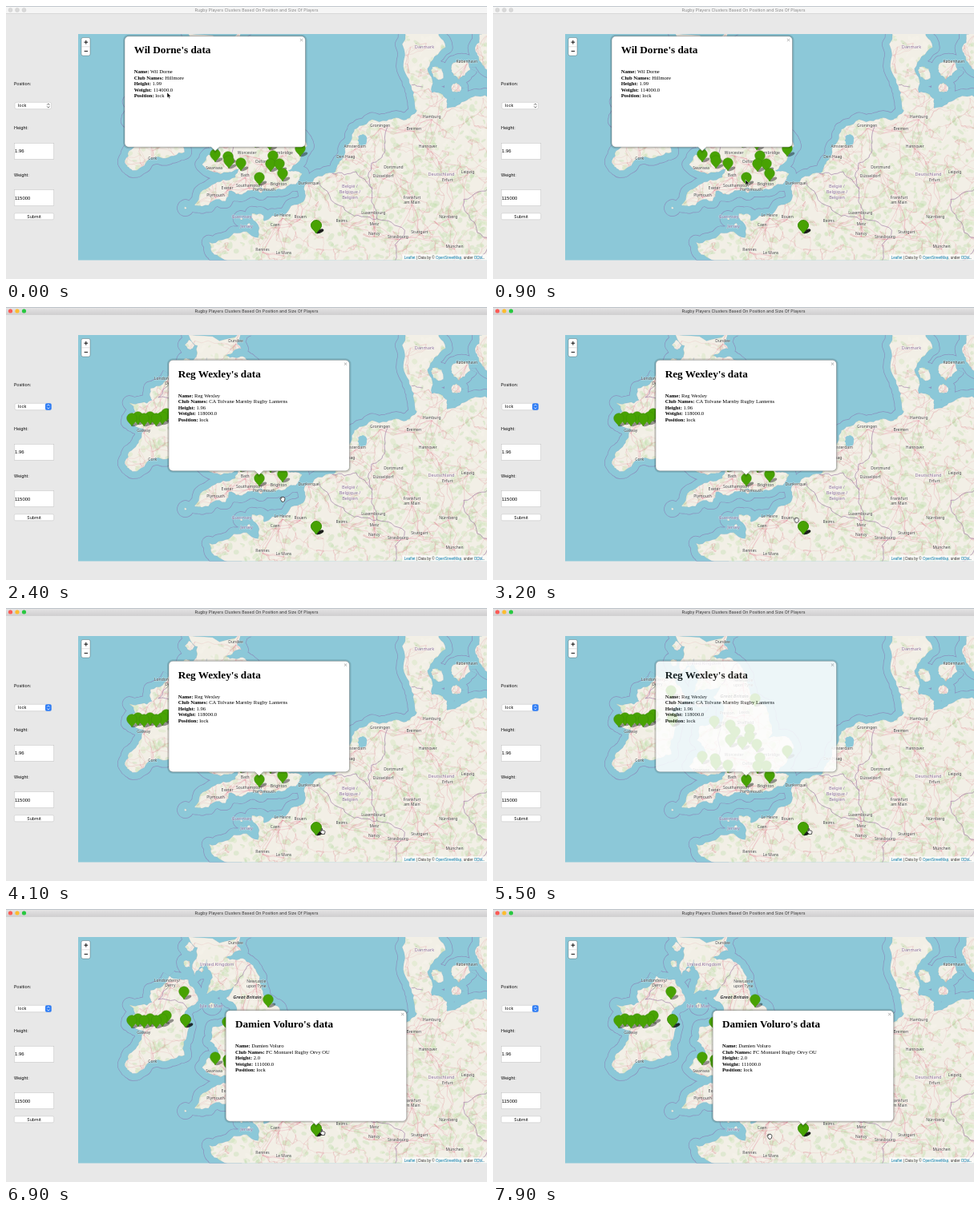
An HTML page with a canvas for the animation above (8000 ms loop, 600 by 341 pixels).

```html
<!DOCTYPE html>
<html lang="en">
<head>
<meta charset="utf-8">
<title>Rugby Players Clusters</title>
<style>
html, body { margin: 0; width: 100%; height: 100%; overflow: hidden; background: #e8e8e8; }
canvas, svg { position: absolute; left: 0; top: 0; width: 600px; height: 341px; }
.ui { font: 5.25px Inter, sans-serif; fill: #000; }
.input { font: 5.9px "Liberation Sans", sans-serif; }
.place { font: 5px "Noto Sans", sans-serif; fill: #444; text-anchor: middle;
  paint-order: stroke; stroke: #fff; stroke-opacity: .45; stroke-width: .9px; }
.country { fill: #8c6f9c; font-size: 5.6px; }
.island { fill: #333; font-weight: 600; font-style: italic; font-size: 5.8px; }
.popup { font: 6.6px "Liberation Serif", serif; fill: #000; }
.popup .head { font-size: 13.2px; font-weight: bold; }
.popup .key { font-weight: bold; }
.credit { font: 4.58px "Liberation Sans", sans-serif; fill: #333; }
.credit tspan { fill: #0078a8; }

.first, .second, .third, #cursor { animation: 8s linear infinite; }
.first { animation-name: first; }
.second { animation-name: second; }
.third { animation-name: third; }
#cursor { animation-name: roam; }
.idle, .active, .arrow, .grab, .point { animation: 8s step-end infinite; }
.idle { animation-name: idle; }
.active { animation-name: active; }
.arrow { animation-name: arrow; }
.grab { animation-name: grab; }
.point { animation-name: point; }

@keyframes first { 0%, 14.875% { opacity: 1 } 17.375%, 100% { opacity: 0 } }
@keyframes second { 0%, 14.6% { opacity: 0 } 17.1%, 68.375% { opacity: 1 } 70.875%, 100% { opacity: 0 } }
@keyframes third { 0%, 83.5% { opacity: 0 } 86%, 100% { opacity: 1 } }
@keyframes idle { 0% { opacity: 1 } 13.75%, 100% { opacity: 0 } }
@keyframes active { 0% { opacity: 0 } 13.75%, 100% { opacity: 1 } }
@keyframes arrow { 0% { opacity: 1 } 18.75%, 100% { opacity: 0 } }
@keyframes grab { 0% { opacity: 0 } 18.75% { opacity: 1 } 43.75% { opacity: 0 } 88.75%, 100% { opacity: 1 } }
@keyframes point { 0% { opacity: 0 } 43.75% { opacity: 1 } 88.75%, 100% { opacity: 0 } }
@keyframes roam {
  0%, 2.5% { transform: translate(201px, 108px); animation-timing-function: ease-in-out }
  11.25%, 17.5% { transform: translate(315px, 217px); animation-timing-function: ease-in-out }
  25%, 32.5% { transform: translate(345px, 240px); animation-timing-function: ease-in-out }
  45%, 87.5% { transform: translate(395px, 279px); animation-timing-function: ease-in-out }
  96.25%, 100% { transform: translate(345px, 284px) }
}
</style>
</head>
<body>
<canvas id="map" width="600" height="341"></canvas>
<svg viewBox="0 0 600 341">
  <defs>
    <linearGradient id="bar" x2="0" y2="1"><stop stop-color="#e6e5e6"/><stop offset="1" stop-color="#d0cfd0"/></linearGradient>
    <clipPath id="frame"><rect x="90" y="35" width="510" height="282.5"/></clipPath>
    <path id="pin" d="M0 10C-1 7-6.3 4.5-6.3 0A6.3 6.3 0 0 1 6.3 0C6.3 4.5 1 7 0 10Z" fill="#48a203" stroke="#3a8a06" stroke-width=".5"/>
    <ellipse id="shade" cx="4.6" cy="7.4" rx="5" ry="2.1" transform="rotate(-24 4.6 7.4)" fill-opacity=".4"/>
  </defs>

  <g class="ui">
    <rect width="600" height="9.5" fill="#f5f5f5"/>
    <g class="idle">
      <g fill="#d9d9d9" stroke="#c4c4c4" stroke-width=".4"><circle cx="5.5" cy="5" r="2.5"/><circle cx="14" cy="5" r="2.5"/><circle cx="22.5" cy="5" r="2.5"/></g>
      <text x="312.5" y="7" text-anchor="middle" fill="#888">Rugby Players Clusters Based On Position and Size Of Players</text>
    </g>
    <g class="active">
      <rect width="600" height="9.5" fill="url(#bar)"/>
      <circle cx="5.5" cy="5" r="2.6" fill="#fc5b56"/><circle cx="14" cy="5" r="2.6" fill="#fdbc2e"/><circle cx="22.5" cy="5" r="2.6" fill="#28c840"/>
      <text x="312.5" y="7" text-anchor="middle" fill="#333">Rugby Players Clusters Based On Position and Size Of Players</text>
    </g>
    <rect width="600" height=".8" fill="#b5bcc4"/>
    <rect y="9.2" width="600" height=".5" fill="#c2c2c2"/>

    <text x="10" y="98.5">Position:</text>
    <text x="10" y="154">Height:</text>
    <text x="10" y="212.5">Weight:</text>
    <g fill="#fff" stroke="#c8c8c8" stroke-width=".6">
      <rect x="11" y="120.3" width="45.5" height="8.4" rx="2"/>
      <rect x="10.3" y="171.3" width="49.4" height="20"/>
      <rect x="10.3" y="229.5" width="49.4" height="20"/>
      <rect x="10.3" y="258.8" width="49.4" height="8" rx="1.6"/>
    </g>
    <rect class="active" x="49" y="120.2" width="7.7" height="8.6" rx="1.8" fill="#2f7df5"/>
    <path class="idle" d="M51.2 123.6l1.6-1.7 1.6 1.7M51.2 125.4l1.6 1.7 1.6-1.7" fill="none" stroke="#444" stroke-width=".8"/>
    <path class="active" d="M51.2 123.6l1.6-1.7 1.6 1.7M51.2 125.4l1.6 1.7 1.6-1.7" fill="none" stroke="#fff" stroke-width=".8"/>
    <text x="15" y="126.4">lock</text>
    <text class="input" x="11" y="183.4">1.96</text>
    <text class="input" x="11" y="241.7">115000</text>
    <text x="35" y="264.7" text-anchor="middle">Submit</text>
  </g>

  <g clip-path="url(#frame)">
    <g id="labels"></g>
    <g id="pins"></g>
  </g>

  <rect x="494" y="310.2" width="106" height="7.3" fill="#fff" fill-opacity=".7"/>
  <text class="credit" x="597" y="315.5" text-anchor="end"><tspan>Leaflet</tspan> | Data by © <tspan>OpenStreetMap</tspan>, under <tspan>ODbL</tspan>.</text>
  <rect x="94" y="39.5" width="11" height="22.5" rx="2" fill="#fff" stroke="#000" stroke-opacity=".25"/>
  <path d="M94 50.8h11" stroke="#ccc" stroke-width=".6"/>
  <path d="M97.4 45.2h4.8M99.8 42.8v4.8M97.6 56.4h4.4" stroke="#111"/>

  <g id="popups"></g>
  <g id="cursor" stroke-linejoin="round">
    <path class="arrow" d="M0 0V6.6L1.5 5.3 2.5 7.5 3.6 7 2.6 4.9H4.7Z" fill="#000" stroke="#fff" stroke-width=".5"/>
    <path class="grab" d="M-2.6 .2C-3.6-1.4-2.4-2-1.6-.7L-1.8-2.3C-1.5-3.3-.7-3-.5-2.2-.3-3.5.7-3.4.8-2.2 1.2-3 2-2.6 2-1.6 2.8-1.9 3.1-1.2 2.9-.3L2.4 2.1 1.6 3.2H-1Z" fill="#fff" stroke="#222" stroke-width=".8"/>
    <path class="point" d="M-1.6-.2V-3.2C-1.5-4.2-.5-4.1-.4-3.2V-1C.1-1.5.7-1.3.9-.7 1.5-1.1 2-.8 2.1-.3 2.8-.6 3.1 0 3 .6L2.4 3.4H-1L-2.9.7C-3.1-.2-2.2-.6-1.6-.2Z" fill="#fff" stroke="#222" stroke-width=".8"/>
  </g>
</svg>

<script>
const byId = id => document.getElementById(id);
const ctx = byId('map').getContext('2d');
let seed = 7;
const rand = () => (seed = seed * 16807 % 2147483647) / 2147483647;

// Web Mercator, longitude and latitude to stage pixels
const project = (lon, lat) => [
  342.65 + 18.87 * lon,
  1343 - 1081.2 * Math.log(Math.tan(Math.PI / 4 + lat * Math.PI / 360))
];

// Main capes and bays; the ragged coast between them is random
const britain = [-2.1,57, -2.87,56.45, -2.6,56.28, -3.6,56.04, -2.5,56, -1.6,55.5, -1.17,54.65, -.08,54.12,
  .1,53.6, .33,53.1, .05,52.9, .5,52.96, 1.3,52.93, 1.75,52.5, 1.25,51.9, .5,51.5, 1.42,51.38, .98,50.93,
  .25,50.74, -1.3,50.8, -2.45,50.55, -3.4,50.65, -3.65,50.22, -5.2,50, -5.7,50.06, -4.55,50.9, -3,51.22,
  -2.6,51.65, -3.5,51.42, -5.2,51.75, -4.1,52.35, -4.7,52.82, -4.5,53.38, -3.1,53.35, -2.9,54.1, -3.6,54.5,
  -3.1,54.95, -4.9,54.65, -4.62,55.5, -4.88,55.95, -5.7,55.35, -5.5,56.4, -6.1,56.8];
const ireland = [-7.35,55.35, -6.1,55.2, -5.45,54.4, -6.3,54, -6.1,53.3, -6.35,52.25, -7.8,52, -9.8,51.5,
  -10.3,51.9, -9.5,52.6, -9,53.2, -10.1,53.5, -9.6,53.9, -10,54.25, -8.5,54.35, -8.6,54.8];
const continent = [8.1,57.2, 8.1,55.6, 8.8,54.6, 9,53.9, 8.3,53.55, 7,53.5, 5.2,53.3, 4.7,52.95, 4.1,52, 3.5,51.4,
  1.6,50.9, 1.5,50.2, .1,49.6, -1.1,49.37, -1.3,49.68, -1.9,49.7, -1.5,48.65, -3.1,48.85, -4.75,48.45,
  -4.4,47.9, -3,47.5, -3,43, 18,43, 18,53.9, 13.5,54.5, 12.3,54.3, 11,54, 11,54.35, 10,54.6, 9.7,55.5,
  10.9,56.3, 10.3,57.2];
// longitude, latitude, radius in degrees
const islands = [[10.4,55.35,.42], [11.8,55.5,.68], [11.6,54.78,.36], [14.1,56.2,1.4], [-4.55,54.22,.18], [-1.3,50.67,.16],
  [-5.25,55.58,.17], [-6.2,55.8,.26], [-6,56.42,.28], [-2.6,49.46,.08], [-2.12,49.21,.1], [-6.3,49.93,.08]];
const borders = [
  [7.1,53.3, 6.9,52.3, 6,51.8, 6.05,50.75, 6.1,50.1, 6.35,49.47, 8.2,48.97, 7.55,47.6],
  [3.4,51.38, 5,51.45, 6.05,50.75],
  [2.55,51.08, 4.15,49.98, 5.8,49.55, 6.35,49.47],
  [-7.3,55.05, -8.1,54.45, -6.1,54.05],
  [-3.05,54.98, -2,55.78], [-3.1,53.3, -2.65,51.6], [8.65,54.9, 9.4,54.82],
  [14,50.8, 12.1,50.3, 12.6,49.4, 13.8,48.6, 12.8,47.6]
];
const cities = [
  ['Dundee',-2.97,56.46], ['Newcastle',-1.61,55.05], ['upon Tyne',-1.61,54.87], ['Londonderry/',-7.5,55.08], ['Derry',-7.3,54.9],
  ['Leeds',-1.55,53.8], ['Sheffield',-1.47,53.38], ['Preston',-2.7,53.76], ['Liverpool',-2.98,53.41],
  ['Galway',-9.05,53.05], ['Cork',-8.47,51.9], ['Worcester',-2.22,52.1], ['Cambridge',.12,52.1], ['Oxford',-1.26,51.75],
  ['Swansea',-4.4,51.48], ['Bath',-2.36,51.2], ['Southampton',-2.1,50.77], ['Portsmouth',-1.09,50.58],
  ['Brighton',-.14,50.82], ['Exeter',-3.53,50.67], ['Plymouth',-4.3,50.37], ['Dunkerque',1.85,50.87],
  ['Le Havre',.11,49.49], ['Rouen',1.3,49.44], ['Caen',-.37,49.1], ['Rennes',-1.2,48], ['Le Mans',.2,47.85],
  ['Reims',4.03,49.25], ['Luxembourg',6.13,49.6], ['Metz',6.18,49.12], ['Nancy',6.18,48.69], ['Strasbourg',7.75,48.57],
  ['Stuttgart',9.18,48.78], ['Frankfurt',8.68,50.27], ['am Main',8.68,50.05], ['Nürnberg',11.08,49.45], ['München',11.5,48.14],
  ['Groningen',6.57,53.2], ['Amsterdam',4.9,52.37], ['Den Haag',4.3,51.95], ['Dortmund',7.46,51.51], ['Düsseldorf',6.78,51.15],
  ['Bremen',8.8,53.08], ['Hamburg',10,53.55], ['Hannover',9.73,52.37], ['Leipzig',12.37,51.34], ['Erfurt',11.03,50.98],
  ['København',12.3,55.68]
];
const regions = [['United Kingdom',263,71], ['Isle of Man',256,123], ['Danmark',522,53], ['Deutschland',543,212],
  ['België /',429,227], ['Belgique /',429,234], ['Belgien',429,241], ['Guernsey',294,265], ['Jersey',300,277]];

// Splits every segment at a randomly shifted midpoint, several times over
function ragged(pts, depth = 3) {
  if (!depth) return pts;
  const out = [pts[0]];
  for (let i = 1; i < pts.length; i++) {
    const [ax, ay] = pts[i - 1], [bx, by] = pts[i], k = (rand() - .5) * .34;
    out.push([(ax + bx) / 2 + (by - ay) * k, (ay + by) / 2 - (bx - ax) * k], pts[i]);
  }
  return ragged(out, depth - 1);
}
function trace(list, closed) {
  const path = new Path2D(), pts = [];
  for (let i = 0; i < list.length; i += 2) pts.push(project(list[i], list[i + 1]));
  if (closed) pts.push(pts[0]);
  ragged(pts).forEach(p => path.lineTo(...p));
  return path;
}
function isle([lon, lat, r]) {
  const ring = [];
  for (let a = 0; a < 6.2; a += Math.PI / 4) {
    const d = r * (.75 + rand() * .5);
    ring.push(lon + d * Math.cos(a), lat + d * .6 * Math.sin(a));
  }
  return trace(ring, true);
}
function line(path, color, width) {
  ctx.strokeStyle = color;
  ctx.lineWidth = width;
  ctx.stroke(path);
}

// Joins each node to its nearest neighbours by slightly bent roads
function roads(nodes, count, color, width) {
  nodes.forEach(a => {
    const dist = b => Math.hypot(a[0] - b[0], a[1] - b[1]);
    [...nodes].sort((b, c) => dist(b) - dist(c)).slice(1, count + 1).forEach(b => {
      const path = new Path2D();
      ragged([a, b], 2).forEach(p => path.lineTo(...p));
      line(path, color, width);
    });
  });
}

function drawMap() {
  const water = '#8cc8d8', land = new Path2D();
  [britain, ireland, continent].forEach(list => land.addPath(trace(list, true)));
  islands.forEach(i => land.addPath(isle(i)));
  ctx.beginPath();
  ctx.rect(90, 35, 510, 282.5);
  ctx.clip();
  ctx.fillStyle = water;
  ctx.fillRect(90, 35, 510, 283);
  ctx.lineJoin = 'round';
  line(land, '#8a90bd', 18.4);
  line(land, water, 17);
  ctx.fillStyle = '#f2efe6';
  ctx.fill(land);

  ctx.save();
  ctx.clip(land);
  const tints = ['rgba(180,214,158,.3)', 'rgba(206,226,184,.36)', 'rgba(246,243,234,.4)'];
  for (let i = 0; i < 2600; i++) {
    const x = 140 + rand() * 460, y = 36 + rand() * 282;
    const wooded = x > 420 && y > 190;
    ctx.fillStyle = tints[wooded ? i % 2 : i % 3];
    ctx.beginPath();
    ctx.ellipse(x, y, 1 + rand() * 4, 1 + rand() * 2.5, rand() * 3, 0, 7);
    ctx.fill();
  }
  const towns = cities.map(c => project(c[1], c[2]));
  const nodes = [...towns];
  while (nodes.length < 650) {
    const p = [135 + rand() * 470, 30 + rand() * 292];
    if (ctx.isPointInPath(land, ...p)) nodes.push(p);
  }
  roads(nodes, 3, 'rgba(222,150,155,.36)', .5);
  roads(towns, 3, 'rgba(226,120,145,.4)', .6);

  ctx.fillStyle = water;
  ctx.fill(isle([5.4, 52.72, .36]));
  borders.forEach(b => line(trace(b), 'rgba(145,105,155,.7)', .8));
  ctx.restore();
  line(land, 'rgba(110,150,170,.45)', .4);
}

const label = (name, x, y, kind = '') => `<text class="place ${kind}" x="${x}" y="${y}">${name}</text>`;

const stack = (n, x, y) => Array(n).fill([x, y]);
const galwayRow = Array.from({ length: 6 }, (_, i) => [157 + i * 7.6, 139 - i % 2 * 2]);
const pins = [...galwayRow, ...stack(3, 224, 138), ...stack(4, 387, 274),
  [222,103], [327,113], [200,133], [276,141], [296,146], [320,151], [302,154], [320,160], [296,164], [311,167], [329,170],
  [367,178], [261,185], [333,187], [277,188], [278,193], [293,196], [330,197], [341,197], [345,209], [316,214]
].sort((a, b) => a[1] - b[1]);
const place = id => pins.map(([x, y]) => `<use href="#${id}" x="${x}" y="${y}"/>`).join('');

function popup(kind, x, y, tip, name, club, height, weight) {
  const rows = [['Name', name], ['Club Names', club], ['Height', height], ['Weight', weight], ['Position', 'lock']];
  const body = `M5 0H220.5a5 5 0 0 1 5 5V133.5a5 5 0 0 1-5 5H${tip + 5}l-5 5-5-5H5a5 5 0 0 1-5-5V5a5 5 0 0 1 5-5Z`;
  return `<g class="popup ${kind}"><g transform="translate(${x} ${y})">
    <path d="${body}" fill="none" stroke="#000" stroke-opacity=".12" stroke-width="4"/>
    <path d="${body}" fill="#fff" stroke="#000" stroke-opacity=".3" stroke-width=".8"/>
    <path d="M218.9 3.2l3.2 3.2m0-3.2l-3.2 3.2" stroke="#aaa" stroke-width=".9"/>
    <text class="head" x="11.7" y="21.5">${name}'s data</text>
    ${rows.map(([key, value], i) => `<text x="11.7" y="${46.7 + i * 7.5}"><tspan class="key">${key}:</tspan> ${value}</text>`).join('')}
  </g></g>`;
}

drawMap();
byId('labels').innerHTML =
  cities.map(([name, lon, lat]) => {
    const [x, y] = project(lon, lat);
    return label(name, x, y - 1.8);
  }).join('') +
  regions.map(r => label(...r, 'country')).join('') +
  label('Great Britain', 301, 111.5, 'island');
byId('pins').innerHTML = place('shade') + place('pin');
byId('popups').innerHTML =
  popup('first', 148, 37.7, 113, 'Wil Dorne', 'Hillmore', '1.99', '114000.0') +
  popup('second', 203, 66.3, 112.7, 'Reg Wexley', 'CA Tolvane Marnby Rugby Lanterns', '1.96', '118000.0') +
  popup('third', 274.2, 126.7, 112.7, 'Damien Voluro', 'FC Montarel Rugby Orvy OU', '2.0', '111000.0');
</script>
</body>
</html>
```
